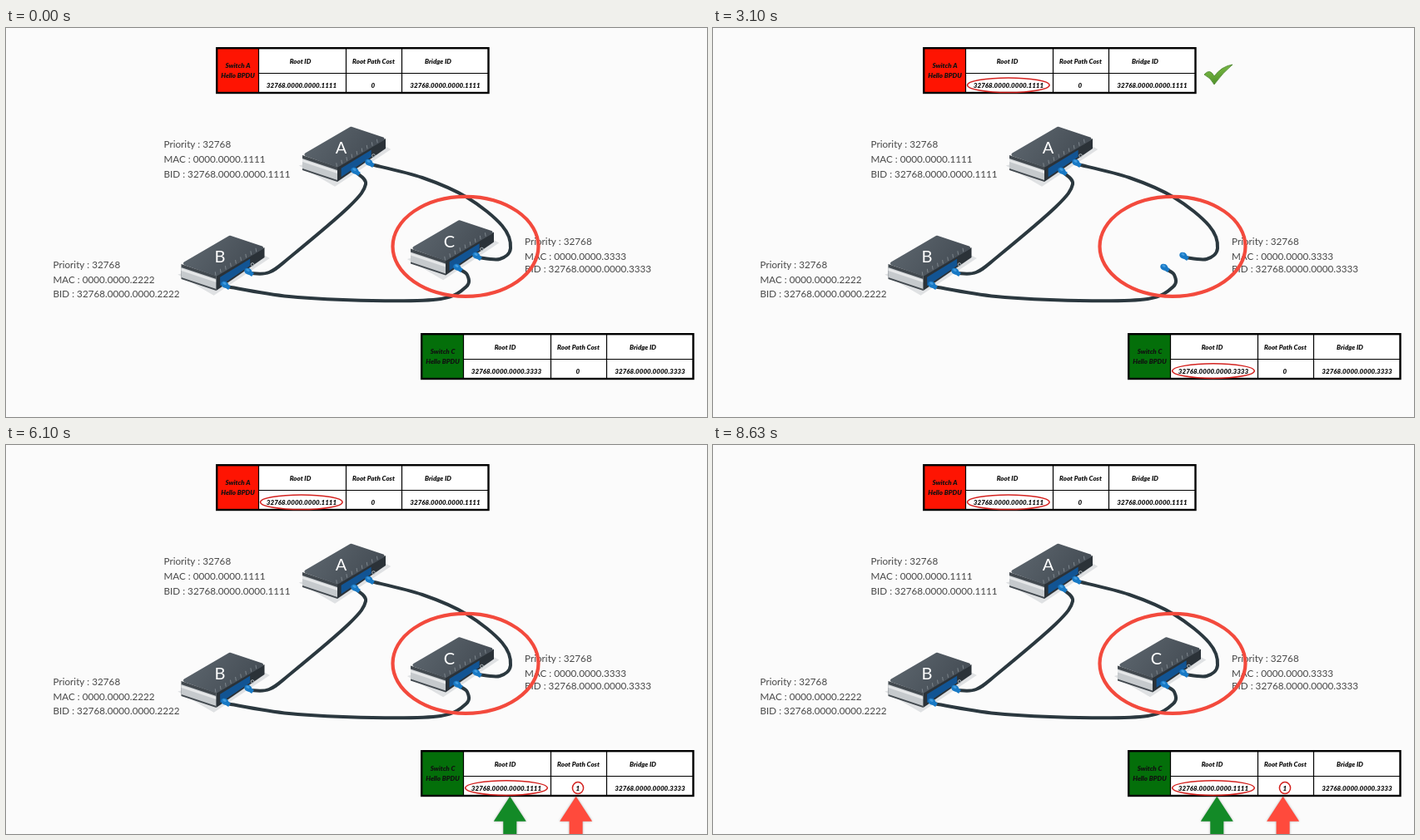
An HTML page with a canvas for the animation above (8660 ms loop, 842 by 468 pixels).

```html
<!DOCTYPE html>
<html lang="en">
<head>
<meta charset="utf-8">
<title>Root bridge election</title>
<style>
html, body { margin: 0; width: 100%; height: 100%; overflow: hidden; background: #fbfbfb; }
canvas { display: block; width: 842px; height: 468px; }
</style>
</head>
<body>
<canvas id="stage" width="842" height="468"></canvas>
<script>
const ctx = document.getElementById('stage').getContext('2d');
const LOOP = 8660;
const FONT = 'Lato, "Open Sans", sans-serif';
const BLUE = '#1879c5';
const MARK = '#d3221f';

function line(color, width, x1, y1, x2, y2) {
  ctx.beginPath();
  ctx.moveTo(x1, y1);
  ctx.lineTo(x2, y2);
  ctx.strokeStyle = color;
  ctx.lineWidth = width;
  ctx.stroke();
}

function ring(x, y, rx, ry, color, width) {
  ctx.beginPath();
  ctx.ellipse(x, y, rx, ry, 0, 0, Math.PI * 2);
  ctx.strokeStyle = color;
  ctx.lineWidth = width;
  ctx.stroke();
}

function text(str, x, y, style, color, align) {
  ctx.font = style + ' ' + FONT;
  ctx.fillStyle = color;
  ctx.textAlign = align;
  ctx.fillText(str, x, y);
}

function at(x, y, draw) {
  ctx.save();
  ctx.translate(x, y);
  draw();
  ctx.restore();
}

// Opacity of something shown from a to b, with short fades
function shown(t, a, b, fade = 120) {
  return Math.max(0, Math.min(1, (t - a) / fade, (b - t) / fade));
}

function withAlpha(a, draw) {
  if (a <= 0) return;
  ctx.save();
  ctx.globalAlpha = a;
  draw();
  ctx.restore();
}

// Oblique box: u runs to the front corner, v to the right, h down
const iso = (u, v, h) => [42 * u + 58 * v, 14 * u - 34 * v + h];
const depth = v => 18 - 6 * v;

function face(fill, ...corners) {
  ctx.beginPath();
  for (const c of corners) ctx.lineTo(...iso(...c));
  ctx.closePath();
  ctx.fillStyle = fill;
  ctx.fill();
}

const sideFace = (fill, a, b) => face(fill, [0, 0, a], [1, 0, a], [1, 0, b], [0, 0, b]);
const frontFace = (fill, v1, v2, a, b) =>
  face(fill, [1, v1, depth(v1) * a], [1, v2, depth(v2) * a],
    [1, v2, depth(v2) * b], [1, v1, depth(v1) * b]);

function device(x, y, letter) {
  at(x, y, () => {
    face('#dfe1e3', [-0.1, 0, 14], [1, -0.05, 22], [1.15, 1, 11], [0.8, 1.05, 11]);
    sideFace('#42494f', 0, 18);
    sideFace('#c6cacd', 4, 16);
    sideFace('#e6e8e9', 5, 8);
    frontFace('#2b3238', 0, 1, 0, 1);
    frontFace('#125493', 0.08, 0.7, 0.25, 0.85);

    const lid = ctx.createLinearGradient(20, -25, 70, 12);
    lid.addColorStop(0, '#59626a');
    lid.addColorStop(1, '#474f57');
    face(lid, [0.05, 0.04, 0], [0.96, 0.03, 0], [0.96, 0.97, 0], [0.05, 0.97, 0]);
    ctx.strokeStyle = lid;
    ctx.lineWidth = 4;
    ctx.lineJoin = 'round';
    ctx.stroke();

    for (let v = 0.08; v < 0.95; v += 0.105) {
      line('#7d868d', 1, ...iso(0.86, v, 0), ...iso(0.96, v - 0.06, 1));
    }
    ring(...iso(1, 0.75, 12), 1.8, 1.8, '#aeb6bb', 1);
    text(letter, 46.5, -2, '400 20px', '#fff', 'center');
  });
}

// Smooth cable through a few points
function cable(...pts) {
  const p = i => pts[Math.max(0, Math.min(pts.length - 1, i))];
  const handle = (i, sign) => [0, 1].map(k => p(i)[k] + sign * (p(i + 1)[k] - p(i - 1)[k]) / 6);
  ctx.beginPath();
  ctx.moveTo(...pts[0]);
  for (let i = 1; i < pts.length; i++) {
    ctx.bezierCurveTo(...handle(i - 1, 1), ...handle(i, -1), ...p(i));
  }
  ctx.strokeStyle = '#2b383f';
  ctx.lineWidth = 4;
  ctx.stroke();
  plug(...pts[0]);
  plug(...pts[pts.length - 1]);
}

function plug(x, y) {
  at(x, y, () => {
    ctx.rotate(0.5);
    ctx.fillStyle = BLUE;
    ctx.beginPath();
    ctx.ellipse(-3, -1, 4.8, 3.8, 0, 0, Math.PI * 2);
    ctx.fill();
    line(BLUE, 5, -2, -0.5, 4, 0);
    ctx.fillStyle = '#3f9ade';
    ctx.beginPath();
    ctx.ellipse(-4, -2, 2.2, 1.4, 0, 0, Math.PI * 2);
    ctx.fill();
  });
}

function wires() {
  cable([421, 174], [432, 188], [412, 215], [342, 275], [316, 294], [293, 295]);
  cable([438, 164], [500, 180], [554, 204], [596, 238], [606, 265], [593, 278], [567, 276]);
  cable([265, 311], [340, 323], [440, 328], [522, 326], [553, 311], [554, 297], [544, 290]);
}

function table(x, y, name, color, root, cost, bridge) {
  const put = (s, dx, dy) => text(s, dx, dy, 'italic 900 8px', '#111', 'center');
  at(x, y, () => {
    ctx.fillStyle = '#fff';
    ctx.fillRect(0, 0, 326, 54);
    ctx.fillStyle = color;
    ctx.fillRect(0, 0, 50, 54);
    for (const cx of [50.5, 155.5, 222.5]) line('#000', 1.2, cx, 0, cx, 54);
    line('#000', 1.2, 50, 30.5, 326, 30.5);
    ctx.strokeStyle = '#000';
    ctx.lineWidth = 2.4;
    ctx.lineJoin = 'miter';
    ctx.strokeRect(0.2, 0.2, 326.3, 53.8);
    put('Switch ' + name, 25.5, 24);
    put('Hello BPDU', 25.5, 35.5);
    put('Root ID', 100.5, 19);
    put('Root Path Cost', 188.5, 19);
    put('Bridge ID', 266, 19);
    put(root, 102, 47.7);
    put(cost, 187.7, 47.7);
    put(bridge, 274.5, 47.7);
  });
}

function label(x, rows, digits) {
  const mac = '0000.0000.' + digits;
  ['Priority : 32768', 'MAC : ' + mac, 'BID : 32768.' + mac]
    .forEach((s, i) => text(s, x, rows[i], '400 11.7px', '#484848', 'left'));
}

function tick() {
  at(590, 43, () => {
    const green = ctx.createLinearGradient(10, 0, 16, 25);
    green.addColorStop(0, '#83c24b');
    green.addColorStop(1, '#4c8f26');
    ctx.beginPath();
    ctx.moveTo(0, 13);
    ctx.quadraticCurveTo(7, 5, 12, 15);
    ctx.quadraticCurveTo(21, 3, 34, 1);
    ctx.quadraticCurveTo(22, 11, 12, 25);
    ctx.quadraticCurveTo(8, 17, 0, 13);
    ctx.fillStyle = green;
    ctx.fill();
    ctx.strokeStyle = '#47802a';
    ctx.lineWidth = 0.8;
    ctx.stroke();
  });
}

function arrow(x, y, color) {
  at(x, y, () => {
    ctx.shadowColor = 'rgba(0,0,0,.3)';
    ctx.shadowBlur = 3;
    ctx.fillStyle = color;
    ctx.beginPath();
    ctx.moveTo(0, 0);
    ctx.lineTo(19.5, 30);
    ctx.lineTo(-19.5, 30);
    ctx.rect(-8, 29, 16, 60);
    ctx.fill();
  });
}

function draw(t) {
  ctx.fillStyle = '#fbfbfb';
  ctx.fillRect(0, 0, 842, 468);

  const learned = t >= 4600;
  const bid = digits => '32768.0000.0000.' + digits;
  table(253, 24, 'A', '#fe1402', bid(1111), '0', bid(1111));
  table(499, 368, 'C', '#046f0a', bid(learned ? 1111 : 3333), learned ? '1' : '0', bid(3333));

  label(189.5, [143.5, 161.5, 179.5], '1111');
  label(56.5, [289, 307, 323.5], '2222');
  label(623, [261, 279, 294], '3333');

  device(356, 153, 'A');
  device(210.5, 284, 'B');
  if (t < 2850 || t >= 3400) device(486, 265.5, 'C');
  wires();
  ring(552, 262.8, 87.5, 60, '#f34a3d', 4.2);

  const late = shown(t, 5150, LOOP + 200);
  withAlpha(Math.max(shown(t, 1100, 4100), late), () => {
    ring(354.8, 68.7, 49.3, 8.8, MARK, 1.5);
    ring(601, 412.6, 49.3, 8.8, MARK, 1.5);
  });
  withAlpha(late, () => ring(687, 412.6, 6.6, 7, MARK, 1.5));
  withAlpha(shown(t, 2200, 4100), tick);

  if (t >= 5600) {
    const left = 1 - Math.min(1, (t - 5600) / 300);
    const y = 422.7 + 50 * left * left;
    arrow(605.3, y, '#138a27');
    arrow(684.6, y, '#ff4a3c');
  }
}

const start = performance.now();
function frame() {
  draw((performance.now() - start) % LOOP);
  requestAnimationFrame(frame);
}
frame();
</script>
</body>
</html>
```
